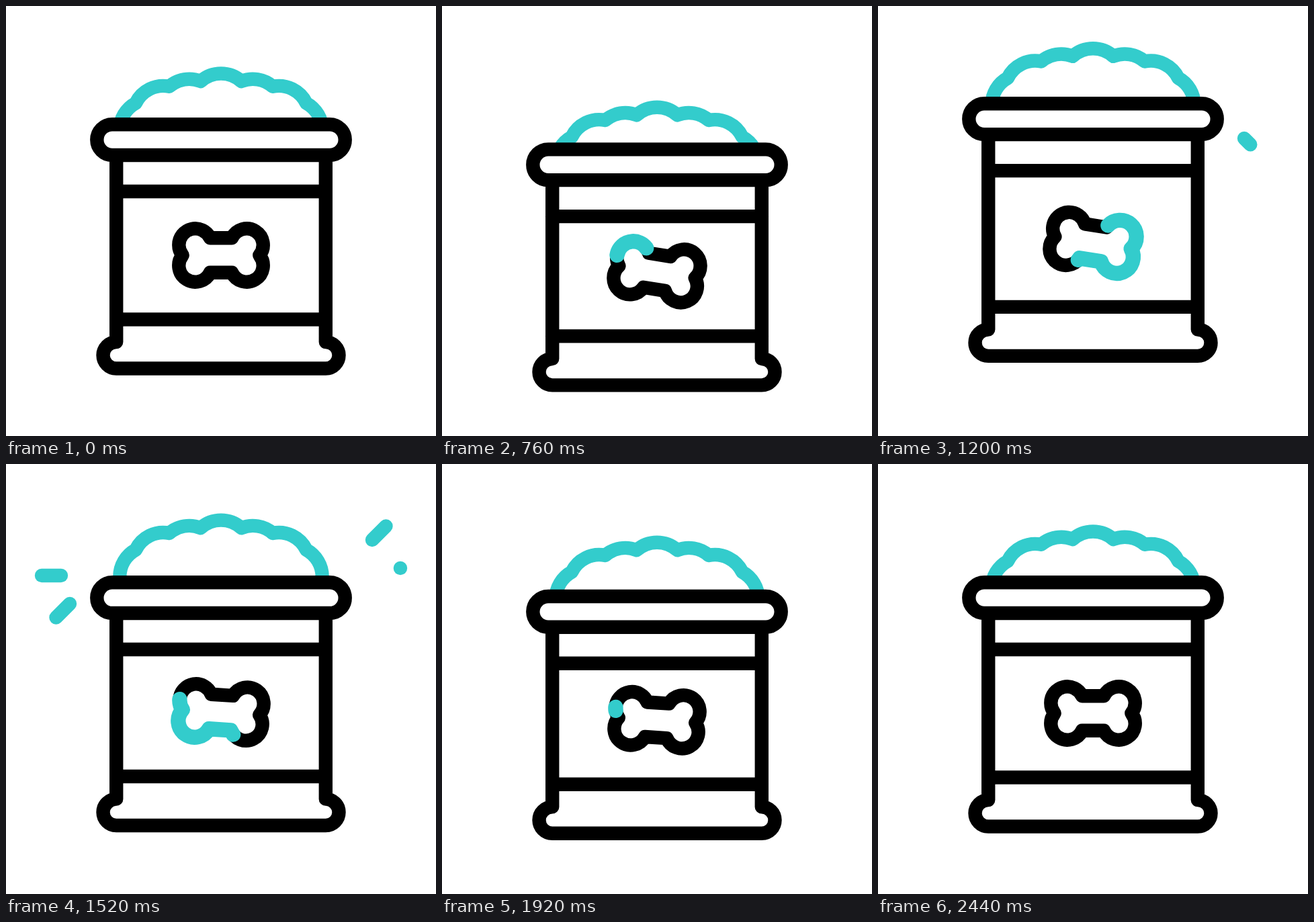
These frames come from a looping animation (640x640 px, 3 s). An HTML page:

```html
<!DOCTYPE html>
<html lang="en">
<head>
<meta charset="utf-8">
<title>Pet food jar</title>
<style>
  html, body { margin: 0; width: 100%; height: 100%; overflow: hidden; background: #fff; }
  svg { display: block; width: 100%; height: 100%; }
  path, rect { fill: none; stroke: #000; stroke-width: 20.4; stroke-linecap: round; stroke-linejoin: round; }
  .teal { stroke: #3cc; }
  #food { stroke-linecap: butt; }
  #lid rect { fill: #fff; }
  #trim { stroke-width: 22.4; }
</style>
</head>
<body>
<svg viewBox="0 0 640 640">
  <path id="food" class="teal"/>
  <path id="body"/>
  <g id="lid">
    <rect x="135.3" y="176.2" width="369.4" height="45.8" rx="22.9"/>
    <path d="M164.2 276H475.8"/>
  </g>
  <path id="band" d="M164.2 466.5H475.8"/>
  <g id="bone">
    <path id="outline"/>
    <path id="trim" class="teal" pathLength="1"/>
  </g>
  <g id="sparks"></g>
</svg>
<script>
const LOOP = 3000, STEP = 40, MID = 320;
const $ = id => document.getElementById(id);
const span = (t, a, b) => {
  const u = Math.min(1, Math.max(0, (t - a) / (b - a)));
  return u * u * (3 - 2 * u);
};

// Eased travel through heights, starting and ending at rest
function bounce(t, beats, heights) {
  const stops = [0, ...heights, 0];
  return beats.slice(1).reduce(
    (y, end, i) => y + (stops[i + 1] - stops[i]) * span(t, beats[i], end), 0);
}
const JAR = [200, 720, 1200, 1800, 2240];
const FOOD = [205, 835, 1270, 1813, 2440];

// Heap of food: equal arcs through mirrored notches
function foodPath() {
  const r = 45.5;
  const left = [[169.3, 184.4], [193, 144.6], [243, 119.8], [289.7, 112.1]];
  const right = left.map(([x, y]) => [2 * MID - x, y]).reverse();
  const arcs = [...left.slice(1), ...right].map(([x, y]) => `A${r} ${r} 0 0 1 ${x} ${y}`);
  return `M169.3 192V184.4${arcs.join('')}V192`;
}

// Bone around its centre: four mirrored lobes, clockwise from the far left
function bonePath() {
  const r = 24.4, cx = 38.3, cy = 15.3;
  const notch = cx + Math.sqrt(r * r - cy * cy);
  const edge = 25.8;
  const corner = cx - Math.sqrt(r * r - (edge - cy) ** 2);
  const waist = 2 * cx - notch + 2 * (notch - cx);
  const arc = (x, y, large) => `A${r} ${r} 0 ${large} 1 ${x} ${y}`;
  return `M${-cx - r} ${-cy}` + arc(-corner, -edge, 0) + `H${corner}` +
    arc(waist, 0, 1) + arc(corner, edge, 1) + `H${-corner}` +
    arc(-waist, 0, 1) + arc(-cx - r, -cy, 0);
}

$('food').setAttribute('d', foodPath());
for (const id of ['outline', 'trim']) $(id).setAttribute('d', bonePath());

// Three sparks fan out on each side
const fan = [
  { side: 1, y: 155, starts: [1350, 1205, 1125] },
  { side: -1, y: 166, starts: [1200, 1350, 1355] }
];
const sparks = fan.flatMap(({ side, y, starts }) => starts.map((start, i) => {
  const row = i - 1, angle = row * Math.PI / 4;
  const el = document.createElementNS('http://www.w3.org/2000/svg', 'path');
  el.setAttribute('class', 'teal');
  $('sparks').append(el);
  return {
    el, start,
    x: MID + side * (row ? 225 : 238), y: y + 42 * row,
    dx: side * 29 * Math.cos(angle), dy: 29 * Math.sin(angle)
  };
}));

function drawSpark({ el, start, x, y, dx, dy }, t) {
  const age = t - start;
  const tip = span(age, 0, 160), tail = span(age, 170, 320);
  el.style.display = age > 0 && age < 320 ? '' : 'none';
  el.setAttribute('d', `M${x + dx * tail} ${y + dy * tail}L${x + dx * tip} ${y + dy * tip}`);
}

function drawBody(lid, base) {
  const top = 222 + lid, foot = 500.1 + base, floor = 539.5 + base;
  $('body').setAttribute('d', `M164.2 ${top}V${foot}A19.7 19.7 0 0 0 164.2 ${floor}` +
    `H475.8A19.7 19.7 0 0 0 475.8 ${foot}V${top}`);
}

function drawTrim(from, to) {
  const { style } = $('trim');
  style.display = to > from ? '' : 'none';
  style.strokeDasharray = `${to - from} 2`;
  style.strokeDashoffset = -from;
}

const move = (id, y) => $(id).setAttribute('transform', `translate(0 ${y})`);

function draw(t) {
  const lid = bounce(t, JAR, [38.5, -30.9, 25.4]);
  const base = bounce(t, JAR, [25.7, -18.6, 12.6]);
  const tilt = 9 * span(t, 200, 440) - 5.2 * span(t, 1200, 1520) - 3.8 * span(t, 1920, 2440);
  move('food', bounce(t, FOOD, [52.3, -44, 17.5]));
  move('lid', lid);
  move('band', base);
  drawBody(lid, base);
  $('bone').setAttribute('transform', `translate(${MID} ${371 + base}) rotate(${tilt})`);
  drawTrim(span(t, 800, 2000), span(t, 520, 1520));
  sparks.forEach(s => drawSpark(s, t));
}

const began = performance.now();
function tick() {
  const t = (performance.now() - began) % LOOP;
  draw(Math.floor(t / STEP) * STEP);
  requestAnimationFrame(tick);
}
draw(0);
requestAnimationFrame(tick);
</script>
</body>
</html>
```
